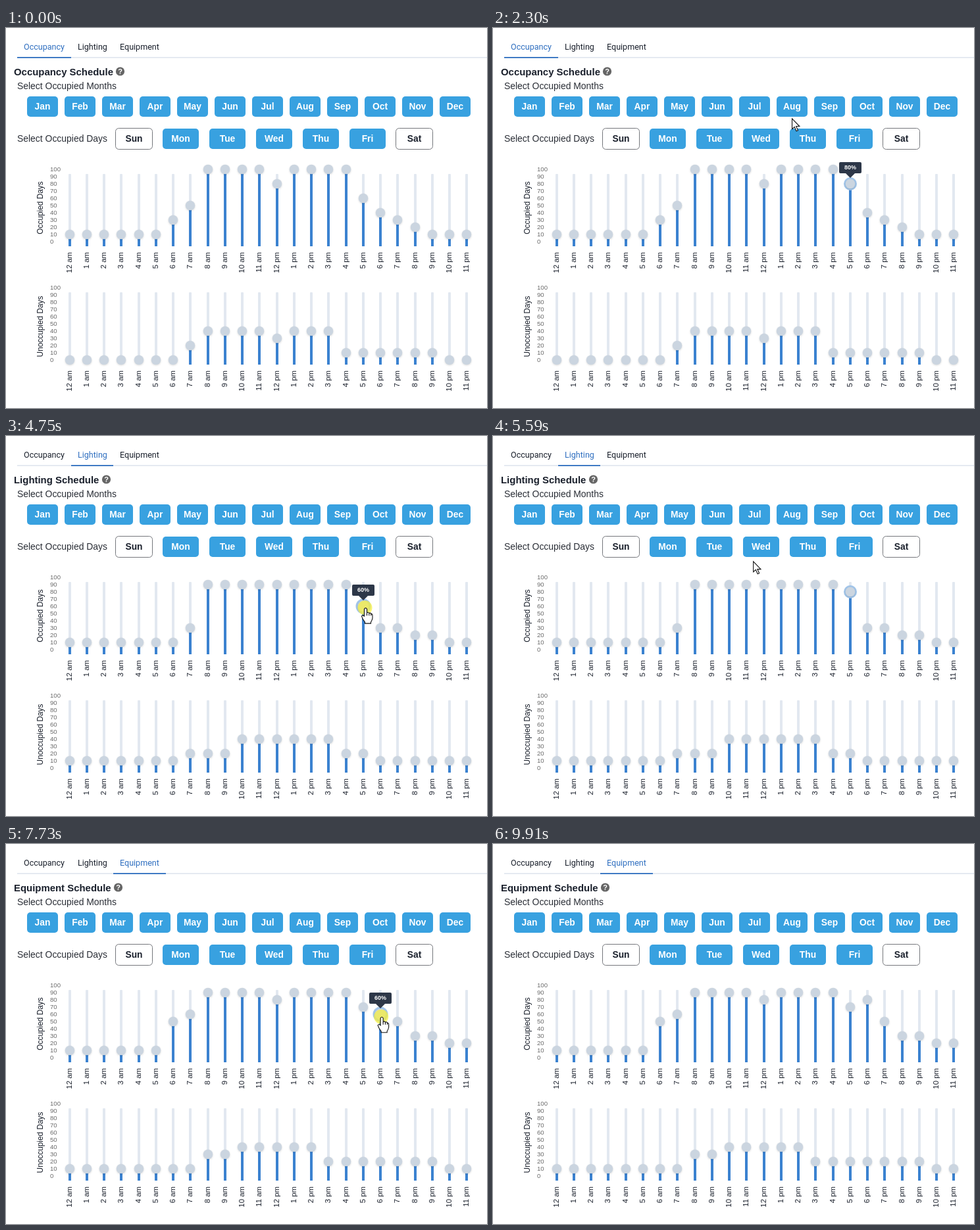
Recreate the animation shown at these times as an HTML page with a canvas. Size 731 by 578 pixels, loop 9970 ms.

```html
<!DOCTYPE html>
<html lang="en">
<head>
<meta charset="utf-8">
<title>Schedules</title>
<style>
html, body { margin: 0; height: 100%; overflow: hidden; background: #fff; }
canvas { display: block; }
</style>
</head>
<body>
<canvas id="stage" width="731" height="578"></canvas>
<script>
const ctx = document.getElementById('stage').getContext('2d');
const LOOP = 9970;
const SANS = '"Liberation Sans", Arial, sans-serif';
const ROBOTO = 'Roboto, "Liberation Sans", sans-serif';
const INK = '#1a202c', BLUE = '#2f6fc0', RING = '#a3c6ea', LINE = '#e2e8f0';

const MONTHS = 'Jan Feb Mar Apr May Jun Jul Aug Sep Oct Nov Dec'.split(' ');
const DAYS = 'Sun Mon Tue Wed Thu Fri Sat'.split(' ');

// Hourly levels in tens of percent, a = 100; each drag sets one occupied hour.
const TABS = [
  { name: 'Occupancy', x: 17, end: 99, icon: 173.5, start: 0,
    occupied: '11111135aaaa8aaaa6432111', unoccupied: '000000024444344411111100',
    drag: { hour: 17, from: 1220, to: 1880, blur: 3170 }, tip: [930, 2430] },
  { name: 'Lighting', x: 99, end: 163, icon: 152.5, start: 3170, blur: 4270,
    occupied: '111111139999999995332211', unoccupied: '111111122244444422111111',
    drag: { hour: 17, from: 4270, to: 5240, blur: 6340 }, tip: [3970, 5330] },
  { name: 'Equipment', x: 163, end: 243, icon: 170.5, start: 6340, blur: 7600,
    occupied: '111111569999899997653322', unoccupied: '111111113344444222222211',
    drag: { hour: 18, from: 7600, to: 8550, blur: 9910 }, tip: [7150, 8460] }
];

// Pointer path: time, x, y, and 1 where it passes without stopping.
const PATH = [
  [130, 693, 510], [1010, 545, 264], [1220, 545, 266], [1880, 547, 247], [1960, 547, 247],
  [2300, 455, 138, 1], [2850, 124, 27], [3200, 124, 27], [4010, 546, 271], [4270, 546, 274],
  [5240, 547, 248], [5590, 396, 191, 1], [6210, 214, 33], [6340, 214, 33], [6690, 532, 281, 1],
  [7040, 584, 270], [7460, 571, 264], [7600, 571, 264], [8400, 573, 247], [8740, 573, 247],
  [9710, 699, 582]
];
const CLICKS = [[3170, 3260], [6340, 6430]];

const ARROW = new Path2D('M0 0V16L3.7 12.6L6.5 19L9 18L6.2 11.8H11.3Z');
const HAND = new Path2D('M-2 2Q0-1 2 2V8Q4 6 5.5 8.5Q7.5 7 8.5 9.5Q10.5 9 10.5 12V16Q10 19 8 22V24H-1V22Q-5 17-6 13Q-5 10.5-2 13Z');

const clamp = v => Math.max(0, Math.min(1, v));
const within = (v, a, b) => v >= a && v < b;
const hourX = i => Math.floor(97 + 26.25 * i);
const knobY = (base, level) => base - 11 * level;

function slope(i, k) {
  const a = PATH[i - 1], b = PATH[i + 1];
  return PATH[i][3] ? (b[k] - a[k]) / (b[0] - a[0]) : 0;
}

function pointerAt(t) {
  const i = Math.max(0, PATH.findLastIndex(p => p[0] <= t));
  const a = PATH[i], b = PATH[i + 1];
  if (!b) return { x: a[1], y: a[2] };
  const span = b[0] - a[0], u = clamp((t - a[0]) / span);
  const s = u * u * (3 - 2 * u);
  const at = k => a[k] + (b[k] - a[k]) * s
    + span * (u * (1 - u) ** 2 * slope(i, k) - u * u * (1 - u) * slope(i + 1, k));
  return { x: at(1), y: at(2) };
}

function text(str, x, y, font, color, align = 'left') {
  ctx.font = font;
  ctx.fillStyle = color;
  ctx.textAlign = align;
  ctx.fillText(str, x, y);
}

function vertical(str, x, y, font, align) {
  ctx.save();
  ctx.translate(x, y);
  ctx.rotate(-Math.PI / 2);
  text(str, 0, 0, font, INK, align);
  ctx.restore();
}

function rect(x, y, w, h, color) {
  ctx.fillStyle = color;
  ctx.fillRect(x, y, w, h);
}

function round(x, y, w, h, r, color) {
  ctx.fillStyle = color;
  ctx.beginPath();
  ctx.roundRect(x, y, w, h, r);
  ctx.fill();
}

function disc(x, y, r, color) {
  ctx.fillStyle = color;
  ctx.beginPath();
  ctx.arc(x, y, r, 0, 7);
  ctx.fill();
}

function button(label, x, y, w, on) {
  if (on) round(x, y, w, 31, 5, '#38a1e0');
  else {
    ctx.strokeStyle = '#75777c';
    ctx.lineWidth = 1;
    ctx.beginPath();
    ctx.roundRect(x - .5, y - .5, w + 1, 32, 5);
    ctx.stroke();
  }
  text(label, x + w / 2, y + 20, `bold 13.8px ${SANS}`, on ? '#fff' : INK, 'center');
}

function header(tab, t) {
  const w = tab.end - tab.x;
  rect(17, 44, 714, 1.8, LINE);
  if (tab.blur && t < tab.blur) {
    round(tab.x - 3, 12, w + 6, 36.5, 2, '#94c2ee');
    rect(tab.x, 15, w, 30.8, '#fff');
  }
  rect(tab.x, 44, w, 1.8, BLUE);
  for (const o of TABS)
    text(o.name, o.x + 10, 33, `12.55px ${ROBOTO}`, o === tab ? BLUE : INK);

  text(tab.name + ' Schedule', 12, 72, `bold 14.93px ${SANS}`, INK);
  disc(tab.icon, 66, 6.6, '#666');
  text('?', tab.icon, 70, `bold 11px ${SANS}`, '#fff', 'center');

  text('Select Occupied Months', 17, 93, `13.93px ${SANS}`, '#2a2e36');
  MONTHS.forEach((m, i) => button(m, 32 + 57 * i, 104, 47, true));
  text('Select Occupied Days', 17, 173, `13.93px ${SANS}`, '#2a2e36');
  DAYS.forEach((d, i) => button(d, 167 + 71 * i, 153, 55, i % 6 > 0));
}

function knob(x, y, ring, pressed) {
  const scale = pressed ? 1.15 : 1;
  if (ring) disc(x, y, 10 * scale, RING);
  ctx.save();
  ctx.shadowColor = 'rgba(0,0,0,.14)';
  ctx.shadowBlur = 3;
  ctx.shadowOffsetY = 1;
  disc(x, y, 7.3 * scale, '#cbd5e0');
  ctx.restore();
}

function chart(title, titleY, base, levels, active) {
  vertical(title, 56, titleY, `11.85px ${SANS}`, 'center');
  for (let v = 0; v <= 10; v++)
    text(v * 10, 67, knobY(base, v) + 3.4, `9.6px ${SANS}`, '#6a6a6a');
  levels.forEach((level, i) => {
    const x = hourX(i), on = active && active.hour === i;
    round(x - 2, base - 103, 4, 110, 1, LINE);
    rect(x - 2, base + 7 - 11 * level, 4, 11 * level, '#3b82d0');
    knob(x, knobY(base, level), on && active.ring, on && active.pressed);
    const label = (i % 12 || 12) + (i < 12 ? ' am' : ' pm');
    vertical(label, x + 3, base + 16, `11.4px ${SANS}`, 'right');
  });
}

function tooltip(x, y, level, alpha) {
  if (alpha <= 0) return;
  ctx.globalAlpha = alpha;
  ctx.fillStyle = '#2d3748';
  ctx.beginPath();
  ctx.roundRect(x - 17, y - 33, 34, 17, 2);
  ctx.moveTo(x - 7, y - 16);
  ctx.lineTo(x + 7, y - 16);
  ctx.lineTo(x, y - 9);
  ctx.fill();
  ctx.globalAlpha = 1;
  text(level * 10 + '%', x, y - 22, `bold 9px ${SANS}`, '#fff', 'center');
}

function pointer(p, hand, pressed) {
  if (pressed) disc(p.x - 1, p.y, 11, 'rgba(246,240,60,.72)');
  ctx.save();
  ctx.translate(p.x, p.y);
  ctx.fillStyle = '#fff';
  ctx.strokeStyle = '#111';
  ctx.lineWidth = 1.1;
  const shape = hand ? HAND : ARROW;
  ctx.fill(shape);
  ctx.stroke(shape);
  if (hand) {
    ctx.beginPath();
    for (const x of [2, 5.3, 8.3]) {
      ctx.moveTo(x, 8.5);
      ctx.lineTo(x, 12);
    }
    ctx.stroke();
  }
  ctx.restore();
}

function draw(t) {
  const tab = TABS.findLast(o => t >= o.start);
  const { drag, tip } = tab;
  const p = pointerAt(t);
  const dragging = within(t, drag.from, drag.to);
  const levels = [...tab.occupied].map(c => parseInt(c, 11));
  if (t >= drag.from)
    levels[drag.hour] = Math.round((332 - pointerAt(Math.min(t, drag.to)).y) / 11);
  const x = hourX(drag.hour), level = levels[drag.hour], y = knobY(325, level);

  rect(0, 0, 731, 578, '#fff');
  header(tab, t);
  chart('Occupied Days', 273.5, 325, levels,
    { hour: drag.hour, ring: within(t, drag.from, drag.blur), pressed: dragging });
  chart('Unoccupied Days', 454, 505, [...tab.unoccupied].map(Number));
  tooltip(x, y, level, Math.min(clamp((t - tip[0]) / 120), clamp(1 - (t - tip[1]) / 120)));

  if (within(t, 130, 9710)) {
    const hand = Math.hypot(p.x - x, p.y - y) < 9
      || p.y < 46 && p.x < 243
      || within(p.y, 104, 135) && (p.x - 32) % 57 < 47
      || within(p.y, 153, 184) && within(p.x, 167, 648) && (p.x - 167) % 71 < 55;
    pointer(p, hand, dragging || CLICKS.some(c => within(t, ...c)));
  }
}

const begin = performance.now();
function tick() {
  draw((performance.now() - begin) % LOOP);
  requestAnimationFrame(tick);
}
tick();
</script>
</body>
</html>
```
